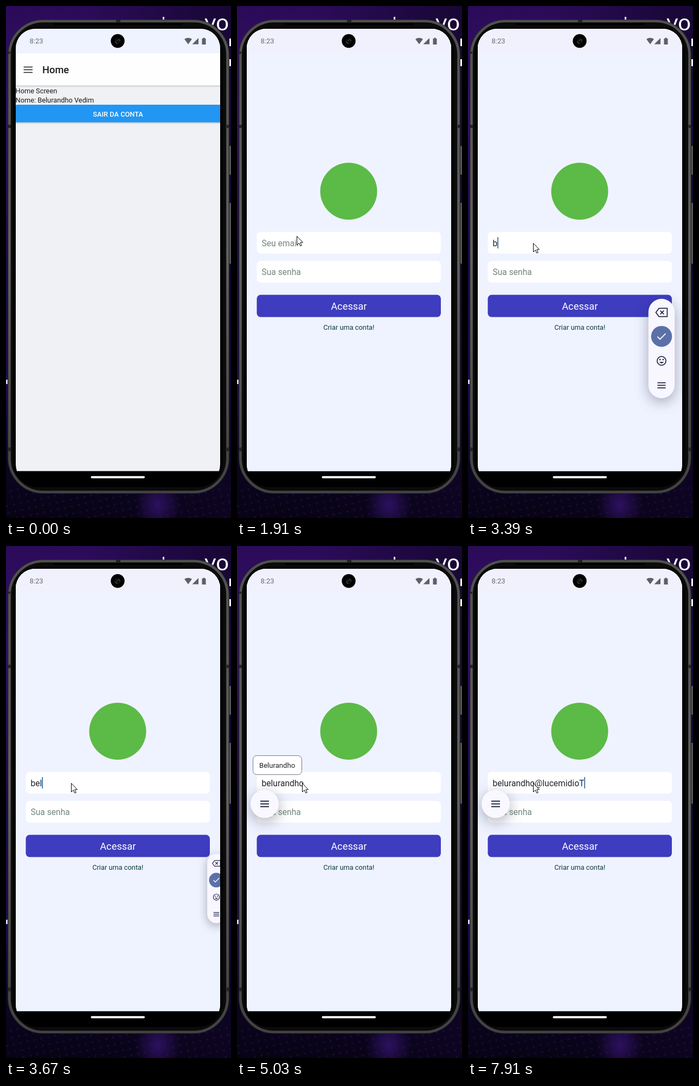
These frames come from a looping animation (415 px wide and 944 px high, 8 s). An HTML page:

```html
<!DOCTYPE html>
<html lang="pt-BR">
<head>
<meta charset="utf-8">
<title>Login</title>
<style>
  html, body { margin: 0; width: 100%; height: 100%; overflow: hidden; background: #0a0418; }
  svg { display: block; width: 415px; height: 944px; font-family: Roboto, sans-serif; }
  .mid { text-anchor: middle; }
  .bold { font-weight: 500; }
  .small { font-size: 12.8px; }
  .field { font-size: 15.6px; }
  .hint { fill: #73867d; }
  .line { fill: none; stroke: #1f2744; stroke-width: 1.8; }
  .float { filter: drop-shadow(0 7px 13px rgba(40, 42, 70, .38)); }
</style>
</head>
<body>
<svg viewBox="0 0 415 944">
  <defs>
    <linearGradient id="sky" x1="0" y1="0" x2="0" y2="1">
      <stop offset="0" stop-color="#2b0b58"/>
      <stop offset=".2" stop-color="#32106a"/>
      <stop offset=".5" stop-color="#1c0a45"/>
      <stop offset=".75" stop-color="#1d0a49"/>
      <stop offset=".9" stop-color="#0b0520"/>
      <stop offset="1" stop-color="#080314"/>
    </linearGradient>
    <linearGradient id="shade">
      <stop offset=".35" stop-color="#0f0524" stop-opacity="0"/>
      <stop offset="1" stop-color="#0f0524" stop-opacity=".7"/>
    </linearGradient>
    <radialGradient id="glow">
      <stop offset="0" stop-color="#2d1160"/>
      <stop offset="1" stop-color="#2d1160" stop-opacity="0"/>
    </radialGradient>
    <linearGradient id="rim" x1="0" y1="0" x2="0" y2="1">
      <stop offset="0" stop-color="#505050"/>
      <stop offset=".5" stop-color="#626262"/>
      <stop offset="1" stop-color="#424242"/>
    </linearGradient>
    <linearGradient id="fall" x1="0" y1="0" x2="0" y2="1">
      <stop offset="0" stop-color="#000" stop-opacity=".2"/>
      <stop offset="1" stop-color="#000" stop-opacity="0"/>
    </linearGradient>
    <pattern id="dots" width="13" height="13" patternUnits="userSpaceOnUse" patternTransform="rotate(-12)">
      <circle cx="5" cy="5" r="2" fill="#2a1460" opacity=".4"/>
    </pattern>
    <clipPath id="app">
      <path d="M18 78A36 36 0 0 1 54 42H359A36 36 0 0 1 395 78V845Q395 851 393 857.5H20Q18 851 18 845Z"/>
    </clipPath>
    <g id="menu"><path class="line" d="M-8-5H8M-8 0H8M-8 5H8"/></g>
  </defs>

  <rect width="415" height="944" fill="url(#sky)"/>
  <rect width="415" height="944" fill="url(#shade)"/>
  <ellipse cx="280" cy="920" rx="42" ry="50" fill="url(#glow)"/>
  <rect y="885" width="415" height="59" fill="url(#dots)"/>
  <g fill="#fff">
    <rect x="289" y="20" width="3" height="16"/>
    <text x="411" y="45" font-size="42" text-anchor="end" font-family="Lato, sans-serif">vo</text>
    <rect x="412" y="60" width="3" height="14"/>
    <rect x="412" y="98" width="3" height="13"/>
    <rect y="689" width="3" height="8" opacity=".8"/>
  </g>

  <!-- Phone body -->
  <g fill="#555">
    <rect x="411" y="258" width="4" height="53"/>
    <rect x="411" y="363" width="4" height="112"/>
  </g>
  <rect x="3" y="25" width="409" height="874" rx="65" fill="#232323"/>
  <rect x="6.500" y="28" width="402" height="868" rx="62" fill="#0b0b0b" stroke="url(#rim)" stroke-width="4.500"/>
  <rect x="88" y="31" width="238" height="4" rx="2" fill="#000"/>
  <g fill="#242424">
    <rect x="203" y="25" width="8" height="6"/>
    <rect x="3" y="219" width="6" height="6"/>
    <rect x="3" y="814" width="6" height="7"/>
    <rect x="3" y="84" width="5" height="4"/>
    <rect x="407" y="219" width="5" height="6"/>
    <rect x="407" y="814" width="5" height="7"/>
  </g>
  <rect x="13" y="38" width="387" height="849" rx="46"/>
  <rect x="156.500" y="866.700" width="99.500" height="4" rx="2" fill="#fff"/>

  <g clip-path="url(#app)">
    <rect x="18" y="42" width="377" height="816" fill="#f0f1f4"/>
    <rect x="18" y="42" width="377" height="46" fill="#eff2ff"/>

    <g id="home">
      <rect x="18" y="146" width="377" height="4" fill="url(#fall)"/>
      <rect x="18" y="87" width="377" height="59.500" fill="#fefefe"/>
      <path d="M32.500 112.500H49M32.500 117.500H49M32.500 122.500H49" stroke="#1c1c1e" stroke-width="1.600"/>
      <text class="bold" x="67" y="124" font-size="18.300" fill="#1c1c1e">Home</text>
      <g class="small" fill="#1a1a1a">
        <text x="17.500" y="160.500">Home Screen</text>
        <text x="17.500" y="178">Nome: Belurandho Vedim</text>
      </g>
      <rect x="18" y="214" width="377" height="4" fill="url(#fall)"/>
      <rect x="18" y="182" width="377.500" height="32.500" rx="2" fill="#2196f3"/>
      <rect id="press" x="18" y="182" width="377" height="32.500" rx="2" fill="#fff"/>
      <text class="mid bold small" x="206.500" y="203.500" fill="#fff">SAIR DA CONTA</text>
    </g>

    <g id="login">
      <rect x="18" y="42" width="377" height="816" fill="#eff3ff"/>
      <rect x="18" y="42" width="377" height="45" fill="#f0f1fd"/>
      <circle cx="206" cy="341.500" r="52.500" fill="#5cba47"/>
      <g fill="#fff">
        <rect x="36.500" y="416.500" width="339.500" height="40" rx="7"/>
        <rect x="36.500" y="470" width="339.500" height="40" rx="7"/>
      </g>
      <text id="hint" class="field hint" x="45.500" y="442.500">Seu email</text>
      <text id="mail" class="field" x="45.500" y="442.500" fill="#22242c"></text>
      <rect id="caret" y="426" width="1.700" height="21" fill="#2c6ca8"/>
      <text class="field hint" x="45.500" y="496">Sua senha</text>
      <rect x="36.500" y="532.600" width="339.500" height="41" rx="7" fill="#3e3cbf"/>
      <text class="mid" x="206.300" y="560" font-size="18.300" fill="#fff">Acessar</text>
      <text class="mid small" x="206.300" y="597" fill="#0c3a3c">Criar uma conta!</text>
    </g>

    <g id="bar">
      <g class="float"><rect x="-25.500" y="-96.500" width="51" height="193" rx="25.500" fill="#f8f6ff"/></g>
      <path class="line" d="M-11-70L-5-78H11V-62H-5ZM-2.500-73.500L4.500-66.500M4.500-73.500L-2.500-66.500"/>
      <circle cy="-23.500" r="20.300" fill="#5b70a9"/>
      <path d="M-8-23L-3-18L8-29" fill="none" stroke="#fff" stroke-width="1.900"/>
      <circle class="line" cy="24" r="8.500"/>
      <path d="M-4.500 26H4.500Q0 32 -4.500 26Z" fill="#1f2744"/>
      <g fill="#1f2744"><circle cx="-3" cy="21.500" r="1.400"/><circle cx="3" cy="21.500" r="1.400"/></g>
      <use href="#menu" y="71.500"/>
    </g>

    <g id="chip">
      <g class="float"><rect id="chipBox" x="-26" y="-26" width="52" height="52" rx="26" fill="#f9f8ff"/></g>
      <use href="#menu"/>
    </g>

    <g id="tip">
      <rect x="29.500" y="386.500" width="90" height="35" rx="7" fill="#fff" stroke="#747681"/>
      <text x="41" y="408.500" font-size="13.100" fill="#202124">Belurandho</text>
    </g>
  </g>

  <!-- Status bar -->
  <text x="43.500" y="69" font-size="13" fill="#686b72">8:23</text>
  <g fill="#5d6066">
    <path d="M329 61Q336 56.500 343 61L336 70.500Z"/>
    <path d="M343.500 70.500H355V59Z"/>
    <path d="M361.500 60H363.500V58.500H366.500V60H368.500V71H361.500Z"/>
  </g>
  <circle cx="206" cy="64.500" r="12.700"/>
  <circle cx="206" cy="64.500" r="6" fill="#0d0d0d"/>
  <path d="M202 65q0 4 4 4M207 61q3 1 3 4M204 64l3-1" fill="none" stroke="#4a4a4a" stroke-width="1.200"/>

  <path id="pointer" d="M.5.5V16.500L4.300 13L6.800 18.500L9.300 17.400L6.800 12H11.500Z" fill="#fff" stroke="#000"/>
</svg>
<script>
  const LOOP = 8000, BLINK = 530, FOCUS = 2450, STEP = 70;
  const MAIL = "belurandho@lucemidioT";
  const keyTimes = [3390, 3530, 3670, 3810, 3880, 3960, 4100, 4240, 4380, 4500, 5100,
    5710, 5840, 6440, 6570, 6640, 6840, 6910, 7180, 7380, 7910];

  // Each row: time, then the values
  const fade = [[1370, 0], [1440, .5], [1510, 1]];
  const press = [[1290, .18], [1370, .3]];
  const toButton = [[390, 307, 760], [600, 270, 640], [880, 195, 340], [1020, 172, 240], [1160, 166, 213]];
  const toField = [[1700, 166, 213], [1770, 160, 235], [1840, 130, 340], [1910, 110, 424], [2120, 112, 431], [2450, 120, 437]];
  const barIn = [[2720, 365, .85, .5], [2850, 352.5, 1, 1]];
  const barOut = [[3390, 357, .95, 1], [3670, 388, .663, 1], [3810, 412, .64, 1]];
  const chipIn = [[3880, 4, .66, 52], [4030, 28, .8, 80], [4170, 51, 1, 100], [4500, 51, 1, 52]];

  const $ = id => document.getElementById(id);
  const show = (el, on) => el.setAttribute("visibility", on ? "visible" : "hidden");
  const place = (el, x, y, s = 1) => el.setAttribute("transform", `translate(${x} ${y}) scale(${s})`);

  // Value of a track, held for STEP ms at a time
  function at(rows, t) {
    const start = rows[0][0], last = rows[rows.length - 1];
    if (t >= last[0]) return last.slice(1);
    const q = start + Math.max(0, Math.floor((t - start) / STEP)) * STEP;
    const i = rows.findIndex(r => r[0] > q);
    const a = rows[i - 1], b = rows[i], p = (q - a[0]) / (b[0] - a[0]);
    return a.slice(1).map((v, k) => v + (b[k + 1] - v) * p);
  }

  function drawMail(t) {
    const n = keyTimes.filter(k => k <= t).length;
    const mail = $("mail"), text = MAIL.slice(0, n);
    if (mail.textContent !== text) mail.textContent = text;
    show($("hint"), n === 0);
    const since = t - (n ? keyTimes[n - 1] : FOCUS);
    show($("caret"), since >= 0 && Math.floor(since / BLINK) % 2 === 0);
    $("caret").setAttribute("x", 45.5 + (n ? mail.getComputedTextLength() : 0));
  }

  function draw(t) {
    show($("pointer"), t >= 390);
    place($("pointer"), ...at(t < 1700 ? toButton : toField, t).map(Math.round));

    $("press").setAttribute("opacity", t < 1290 ? 0 : at(press, t)[0]);
    $("login").setAttribute("opacity", at(fade, t)[0]);
    drawMail(t);

    const [bx, bs, bo] = at(t < 3390 ? barIn : barOut, t);
    show($("bar"), t >= 2720 && t < 3880);
    place($("bar"), bx, 631.5, bs);
    $("bar").setAttribute("opacity", bo);

    const [cx, cs, ch] = at(chipIn, t);
    show($("chip"), t >= 3880);
    place($("chip"), cx, 475.5, cs);
    $("chipBox").setAttribute("height", ch);

    show($("tip"), t >= 5030 && t < 5100);
  }

  const began = performance.now();
  function tick() {
    draw((performance.now() - began) % LOOP);
    requestAnimationFrame(tick);
  }
  tick();
</script>
</body>
</html>
```
